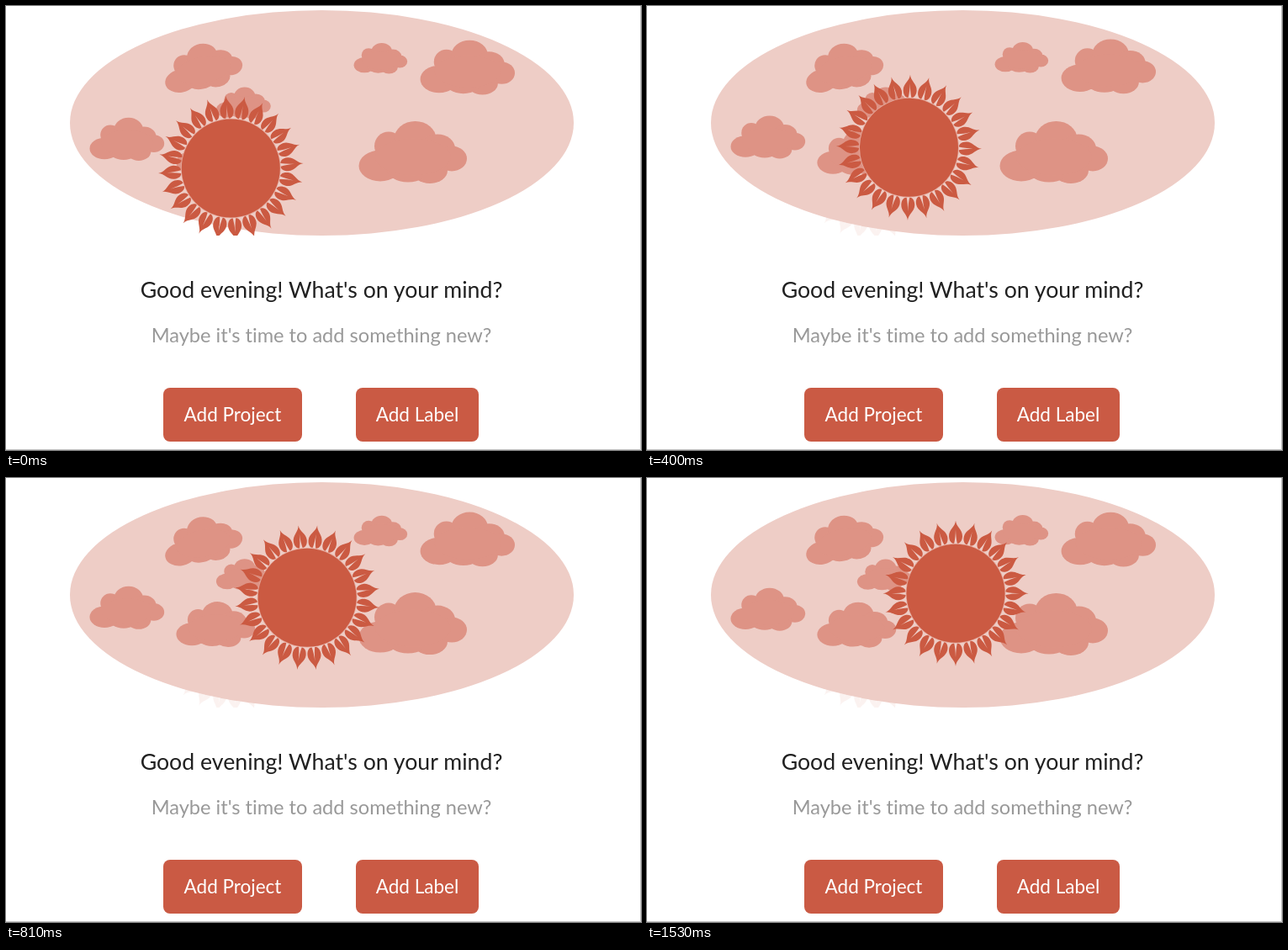
These frames come from a looping animation (755 by 528 pixels, 1600 ms). An HTML page:

```html
<!DOCTYPE html>
<html lang="en">
<head>
<meta charset="utf-8">
<title>Good evening</title>
<style>
  html, body { margin: 0; width: 100%; height: 100%; overflow: hidden; background: #fff; }
  svg { display: block; width: 755px; height: 528px; }
  text { font-family: Lato, sans-serif; font-variant-ligatures: none; text-anchor: middle; }
  .title { font-size: 26.7px; fill: #202020; }
  .hint { font-size: 23.6px; fill: #999; }
  .label { font-size: 22.5px; fill: #fff; }
  .accent { fill: #cb5a42; }
  .button { fill: #ca5a44; }
  .cloud { fill: #de9385; }
  .frame { fill: none; stroke: #c4c4c4; }
</style>
</head>
<body>
<svg viewBox="0 0 755 528">
  <defs>
    <clipPath id="sky"><rect width="755" height="273"/></clipPath>
    <path id="petal" d="M0-86.500C-.6-79-8.200-76-8-68C-7.800-62-4.500-59-1.800-59.500Q-.3-66 0-76Q.3-66 1.800-59.500C4.500-59 7.800-62 8-68C8.200-76 .6-79 0-86.500Z"/>
    <g id="petals"></g>
    <g id="puff">
      <ellipse cx="-39" cy="15.500" rx="25.500" ry="18.500"/>
      <ellipse cx="-29" cy="-8" rx="17" ry="17"/>
      <ellipse cx="2.500" cy="-16.500" rx="25" ry="21"/>
      <ellipse cx="29" cy="-5" rx="21" ry="17"/>
      <ellipse cx="46" cy="7" rx="18" ry="15"/>
      <ellipse cx="20" cy="21" rx="21" ry="15.500"/>
      <ellipse cx="-6" cy="18" rx="26" ry="17"/>
      <ellipse cy="5" rx="45" ry="22"/>
    </g>
  </defs>

  <g clip-path="url(#sky)">
    <use id="trace" href="#petals" class="accent" opacity=".07"/>
    <ellipse cx="375.500" cy="139" rx="299.500" ry="134" fill="#eecdc6"/>
    <g id="clouds" class="cloud"></g>
    <g id="sun" class="accent">
      <circle r="59.300" fill="#e3a79a"/>
      <circle r="58.500"/>
      <use href="#petals"/>
    </g>
  </g>

  <text class="title" x="375" y="347">Good evening! What's on your mind?</text>
  <text class="hint" x="375" y="400">Maybe it's time to add something new?</text>
  <rect class="button" x="187" y="454" width="165" height="64" rx="8"/>
  <text class="label" x="269.500" y="494">Add Project</text>
  <rect class="button" x="416" y="454" width="146" height="64" rx="8"/>
  <text class="label" x="489" y="494">Add Label</text>
  <path class="frame" d="M0 527.500H754.500V0"/>
</svg>

<script>
const LOOP = 1600, STEP = LOOP / 24, RISE = 875;

const $ = id => document.getElementById(id);
const clamp = v => Math.min(1, Math.max(0, v));
const place = (el, transform) => el.setAttribute('transform', transform);

function addUse(parent, href) {
  const el = document.createElementNS('http://www.w3.org/2000/svg', 'use');
  el.setAttribute('href', href);
  return parent.appendChild(el);
}

for (let a = 0; a < 360; a += 15) place(addUse($('petals'), '#petal'), `rotate(${a})`);

// Each cloud rides one full sine wave: it begins at start and lasts span ms
const clouds = [
  { x: 144, y: 156.5, size: .69, start: -110, span: 1000, amp: 3.5 },
  { x: 233.8, y: 72.5, size: .735, start: 450, span: 920, amp: 2.2, tilt: -11 },
  { x: 282.5, y: 115.5, size: .505, start: 550, span: 640, amp: -.6 },
  { x: 249.5, y: 175, size: .73, start: 550, span: 640, amp: -1 },
  { x: 445.5, y: 62.5, size: .495, start: 200, span: 960, amp: -1 },
  { x: 549, y: 73.5, size: .875, start: 270, span: 1080, amp: -1.9 },
  { x: 484, y: 174.5, size: 1, start: 450, span: 900, amp: -1.4 }
];
for (const c of clouds) c.el = addUse($('clouds'), '#puff');

// left runs from 1 (low) to 0 (risen)
const sunAt = left =>
  `translate(${367 - 99.7 * left} ${137.3 + 55.7 * left}) rotate(${-79 * left})`;
place($('trace'), sunAt(1));

function draw(t) {
  place($('sun'), sunAt(1 - clamp(t / RISE) ** 1.04));
  for (const c of clouds) {
    const bob = c.amp * Math.sin(2 * Math.PI * clamp((t - c.start) / c.span));
    place(c.el, `translate(${c.x} ${c.y + bob}) rotate(${c.tilt || 0}) scale(${c.size})`);
  }
}

const begin = performance.now();
function tick() {
  const t = (performance.now() - begin) % LOOP;
  // The picture holds for each step; a small lead keeps step edges on time
  draw(Math.floor((t + 4) / STEP) % 24 * STEP);
  requestAnimationFrame(tick);
}
tick();
</script>
</body>
</html>
```
